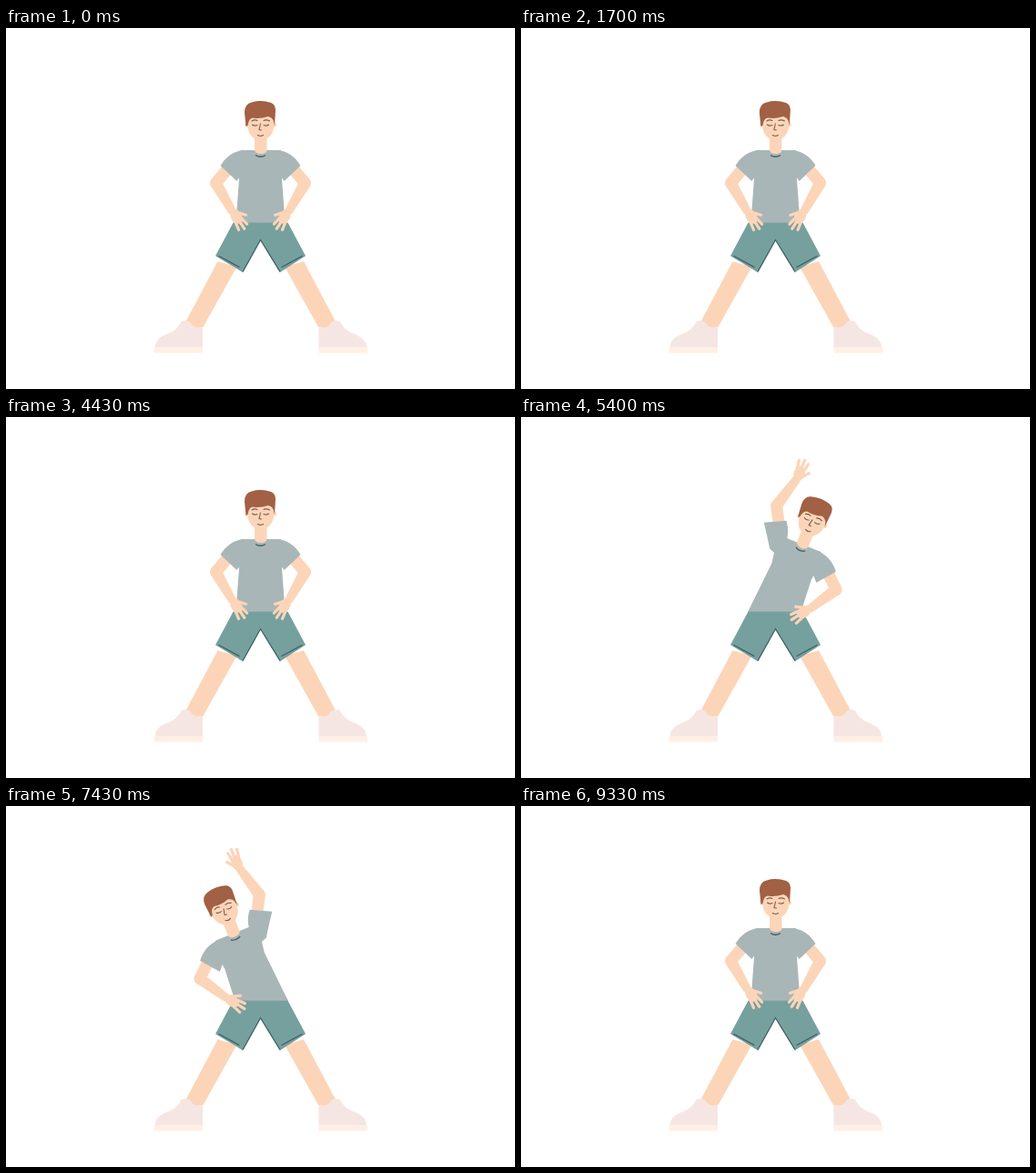
An HTML page for the animation above (9.36 s loop, 559 by 396 pixels).

```html
<!DOCTYPE html>
<html lang="en">
<head>
<meta charset="utf-8">
<title>Side bends</title>
<style>
  html, body { margin: 0; width: 100%; height: 100%; overflow: hidden; background: #fff; }
  svg { display: block; width: 559px; height: 396px; }
  .skin { fill: #fcd5b8; }
  .limb { fill: none; stroke: #fcd5b8; stroke-linecap: round; stroke-linejoin: round; }
  .shirt { fill: #a9b6b8; }
  .shorts { fill: #76a09e; }
  .hair { fill: #a26044; }
  .shoe { fill: #f6e6e3; }
  .sole { fill: #fef0e5; }
  .line { fill: none; stroke: #79604f; stroke-width: 1.1; stroke-linecap: round; }
  .seam { fill: none; stroke: #3d6164; stroke-width: 1.3; }
</style>
</head>
<body>
<svg viewBox="0 0 559 396">
  <defs>
    <g id="leg">
      <path class="skin" d="M306 262 L327 256 L362 322 L355 330 L343 328Z"/>
      <path class="shoe" d="M343.500 351V328Q351 330 355 326Q359 319 367 322Q371 331 381 335Q396 340 396 351Z"/>
      <path class="sole" d="M343.500 350H397V356.500H343.500Z"/>
    </g>
  </defs>

  <use href="#leg"/>
  <use href="#leg" transform="matrix(-1 0 0 1 559.500 0)"/>

  <g class="lean">
    <path class="shirt" d="M258.500 134H301.500L307 141L303 166L306.500 213L307.500 225H251.500L252.500 213L256 166L252 141Z"/>
  </g>

  <path class="shorts" d="M249.500 213.500H309.500L329 250L301 268L279.500 232L260 268L230 250Z"/>
  <path class="seam" stroke-width="1" d="M260 267.500L279.500 232.500L301 267.500M233.500 250L256.500 262.500M325.500 250L302.500 262.500"/>

  <g class="lean">
    <g id="leftSide" transform="matrix(-1 0 0 1 559 0)"></g>
    <g id="rightSide"></g>

    <path class="skin" d="M273 117H286.500V134Q286 138 280 138Q274 138 273 134Z"/>
    <path class="seam" d="M274 139.500Q279.500 143 285 139.500"/>
    <circle class="skin" cx="265" cy="106" r="2.500"/>
    <circle class="skin" cx="294.500" cy="106" r="2.500"/>
    <path class="skin" d="M265 94H294.500V107Q293.500 117 286.500 121.500Q279.500 125 273 121.500Q266 117 265 107Z"/>
    <path class="hair" d="M263.500 108L262 93Q262 83 270 81.500Q280 78.500 291 82Q296 84 296 90L295 107L293.500 101Q292 98 288 97Q279 100 271 98.500Q266.500 99 265.500 107Z"/>
    <path class="line" d="M270 102Q273 100 276 101.500M283 101.500Q286 100 289.500 102M270.500 106Q273 108 276 106.500M283 106.500Q286 108 288.500 106M279.500 105L278 111.500L280.500 112"/>
    <path class="line" stroke="#b5694f" d="M276.500 117.500Q279.500 119.500 282.500 117.500"/>
  </g>
</svg>

<script>
const CYCLE = 4680, MOVE = 500, BEND = 1650, START = 50;
const fingers = [[11, 11], [20, 7], [23, 2], [21, -4]];

const armMarkup = `<g class="upper">
  <path class="limb" stroke-width="13" d="M9 10L26 30"/>
  <g class="fore">
    <path class="skin" d="M0 -6.500L37 -4.500V4.500L0 6.500Z"/>
    <g class="hand">
      <ellipse class="skin" cx="7" cy="1" rx="8.500" ry="6"/>
      <path class="limb" stroke-width="3.200" d="${fingers.map(([x, y]) => `M5 ${y / 2}L${x} ${y}`).join('')}"/>
    </g>
  </g>
  <path class="shirt" d="M-4 -6Q12 -4 21 11L3 28Q-5 16 -14 4V-5Z"/>
</g>`;

function makeArm(id) {
  const side = document.getElementById(id);
  side.innerHTML = armMarkup;
  const [upper, fore, hand] = ['upper', 'fore', 'hand'].map(c => side.querySelector('.' + c));
  // raise: 0 hand on hip, 1 overhead; prop: how much the body leans onto this side
  return (raise, prop) => {
    const set = (el, value) => el.setAttribute('transform', value);
    set(upper, `translate(302.5 140) rotate(${-110 * raise - 8 * prop})`);
    set(fore, `translate(26 30) rotate(${120 - 115 * raise ** 1.5 + 10 * prop})`);
    set(hand, `translate(36 0) scale(1 ${raise > 0.5 ? -1 : 1}) rotate(${-18 * raise})`);
  };
}

const poseLeft = makeArm('leftSide'), poseRight = makeArm('rightSide');
const leaning = document.querySelectorAll('.lean');

// Quick away from rest, soft into the stretch, and the same in reverse.
function stretch(t) {
  const edge = Math.min(t, BEND - t) / MOVE;
  return Math.sin(Math.PI / 2 * Math.max(0, Math.min(1, edge)));
}

function draw() {
  const t = performance.now() % CYCLE - START;
  const right = stretch(t), left = stretch(t - BEND);
  const angle = 22 * (right - left);
  leaning.forEach(g => g.setAttribute('transform', `rotate(${angle} 279.5 213)`));
  poseLeft(right, left);
  poseRight(left, right);
  requestAnimationFrame(draw);
}
draw();
</script>
</body>
</html>
```
